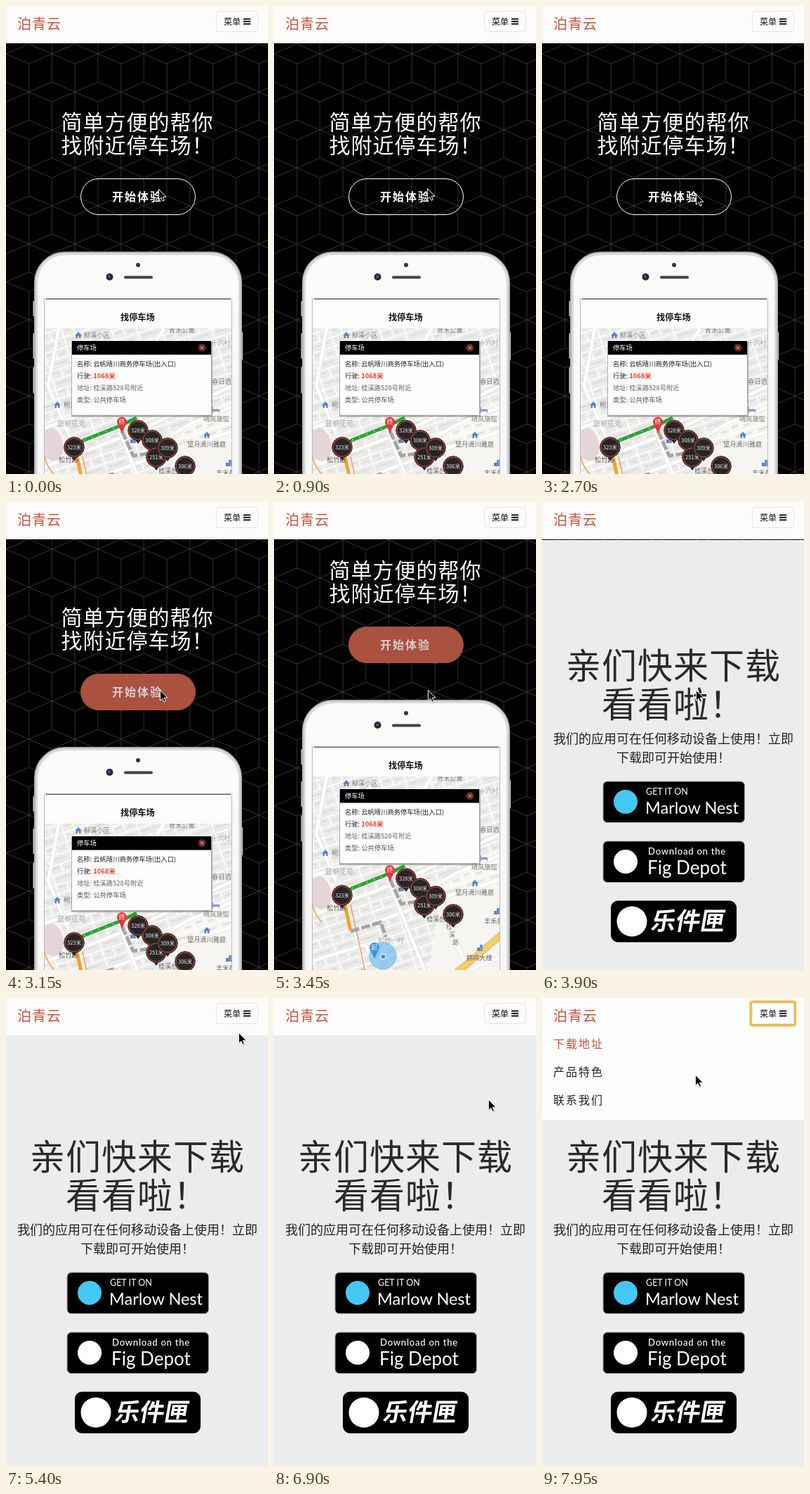
These frames come from a looping animation (373 px wide and 665 px high, 8000 ms). An HTML page:

```html
<!DOCTYPE html>
<html lang="zh">
<head>
<meta charset="utf-8">
<style>
html, body { margin: 0; width: 100%; height: 100%; overflow: hidden; background: #ebecee; }
svg { display: block; width: 373px; height: 665px; font-family: "Noto Sans CJK SC", "Noto Sans", sans-serif; }
.latin { font-family: Lato, "Open Sans", sans-serif; }
.thin { font-weight: 300; }
.bold { font-weight: 700; }
.mid { font-weight: 500; }
</style>
</head>
<body>
<svg id="stage" viewBox="0 0 373 665">
<defs>
  <pattern id="cubes" width="65.5" height="108" patternUnits="userSpaceOnUse" patternTransform="translate(32.5 54)">
    <path d="M0 0L32.75 14L0 28M65.5 0L32.75 14L65.5 28M0 28V108M65.5 28V108M32.75 14V54M32.75 82V108M32.75 0V14M32.75 54L0 68L32.75 82L65.5 68Z"
      fill="none" stroke="#393939" stroke-width=".9"/>
  </pattern>
  <pattern id="blocks" width="34" height="27" patternUnits="userSpaceOnUse" patternTransform="rotate(-18)">
    <path d="M0 .7H34M.7 0V27M17 0V14M0 14H34" stroke="#fff" stroke-width="1.5"/>
    <path d="M4 5H13M21 8H30M5 20H28" stroke="#dfdedc" stroke-width="2.4"/>
  </pattern>
  <linearGradient id="shell" x2="0" y2="1">
    <stop offset="0" stop-color="#fbfbfa"/><stop offset=".8" stop-color="#f5f5f5"/><stop offset="1" stop-color="#e7e8e9"/>
  </linearGradient>
  <linearGradient id="ring" x2="1" y2="1">
    <stop offset="0" stop-color="#222"/><stop offset=".5" stop-color="#b9b9b9"/><stop offset="1" stop-color="#333"/>
  </linearGradient>
  <clipPath id="mapClip"><rect x="55" y="458" width="266" height="389"/></clipPath>
  <clipPath id="navClip"><rect id="navBox" width="373" height="53"/></clipPath>
</defs>
<g id="page"></g>
<g id="nav" clip-path="url(#navClip)"></g>
<g id="cursor">
  <path d="M0 0V15.8L3.6 12.4L5.9 17.6L8.7 16.4L6.4 11.3H11.2Z" transform="translate(.6 1)" opacity=".25"/>
  <path d="M.4 .4V15.4L3.8 12.2L6 17.2L8.4 16.2L6.2 11.2H11Z" stroke="#fff"/>
</g>
</svg>
<script>
const $ = id => document.getElementById(id);
const RED = '#c8503f', GRAY = '#77787c';

// cy is the visual middle of the line
const text = (x, cy, s, size, fill = '#222', cls = '', more = '') =>
  `<text x="${x}" y="${cy + size * .375}" font-size="${size}" fill="${fill}" class="${cls}" ${more}>${s}</text>`;
const rect = (x, y, w, h, fill, r = 0, more = '') =>
  `<rect x="${x}" y="${y}" width="${w}" height="${h}" rx="${r}" fill="${fill}" ${more}/>`;
const circle = (x, y, r, fill, more = '') => `<circle cx="${x}" cy="${y}" r="${r}" fill="${fill}" ${more}/>`;
const line = (d, stroke, w = 1, more = '') =>
  `<path d="${d}" fill="none" stroke="${stroke}" stroke-width="${w}" ${more}/>`;
const spaced = n => `letter-spacing="${n}"`;
const centered = 'text-anchor="middle"';

const marker = (x, y, label) =>
  `<path d="M${x - 5} ${y + 12}L${x} ${y + 19}L${x + 5} ${y + 12}Z" fill="#2a2324"/>` +
  circle(x, y, 14.3, '#282425', 'stroke="#3b2524"') +
  circle(x, y, 12.8, 'none', `stroke="#a9463d" stroke-width="1.2"`) +
  text(x, y, label, 7.5, '#eee', '', centered);
const pin = (x, y, label, fill) =>
  `<path d="M${x - 6} ${y + 3}L${x} ${y + 16}L${x + 6} ${y + 3}Z" fill="${fill}"/>` +
  circle(x, y, 7, fill) + text(x, y, label, 9, '#fff', '', centered);
const house = (x, y, fill = '#5b83c9') =>
  `<path d="M${x - 5} ${y}L${x} ${y - 5}L${x + 5} ${y}H${x + 3.5}V${y + 4}H${x + 1}V${y + 1}H${x - 1}V${y + 4}H${x - 3.5}V${y}Z" fill="${fill}"/>`;
const tower = (x, y) => rect(x - 4, y - 1, 4, 5, '#5b83c9') + rect(x, y - 5, 4, 9, '#6f92d2');

function hero() {
  return rect(0, 0, 373, 1051, '#000') + rect(0, 0, 373, 1051, 'url(#cubes)') +
    text(78.5, 165, '简单方便的帮你', 30, '#fff', 'thin', spaced(1)) +
    text(78.5, 198, '找附近停车场！', 30, '#fff', 'thin', spaced(1)) +
    '<g id="start">' + rect(106.5, 245.5, 163, 51, 'none', 25.5, 'id="pill" stroke="#fff"') +
    text(151, 271, '开始体验', 16, '#fff', 'bold', 'id="pillText" ' + spaced(2)) + '</g>';
}

function map() {
  const labels = [
    [111, 468, '柳溪小区', 9.2, GRAY], [232, 461, '青禾公寓', 9.2, GRAY], [292, 479, '十六村', 9.2, '#aaa'],
    [293, 534, '春日酒店', 9.2, GRAY], [281, 587, '晴岚旅馆', 9.2, GRAY], [258, 623, '望月清川雅庭', 9.2, '#666'],
    [82, 567, '桐江苑', 9.2, GRAY], [73, 593, '碧桐花苑', 10, '#aaa'], [75, 645, '松竹路', 9.2, '#555'],
    [217, 661, '桂溪创意区', 9.2, '#666'], [299, 664, '丰禾苑', 9.2, '#666'], [148, 691, '松竹一村', 9.2, '#aaa'],
    [55, 737, '松竹二村', 9.2, '#aaa'], [274, 716, '鹤鸣大楼', 9.2, '#666'], [237, 739, '云川河湖', 9.2, '#666'],
    [256, 750, '研究所', 9.2, '#666'], [60, 787, '青溪区教', 9.2, '#666'], [56, 798, '师研习学院', 9.2, '#666'],
    [178, 800, '银帆乐城', 9.2, '#a77bc5'], [118, 825, '松竹花苑', 9.2, '#666'], [53, 845, '云鹤公园', 9.2, '#8aa88c'],
    [245, 672, '桂', 9, GRAY], [249, 683, '溪', 9, GRAY], [254, 694, '路', 9, GRAY],
    [123, 734, '竹', 8, '#dc9b6c'], [126, 744, '街', 8, '#dc9b6c']
  ];
  const roads = ['M55 600L160 560L225 458', 'M55 655L190 603L321 540', 'M97 627L60 540L75 458',
    'M185 640L260 595L321 570', 'M230 610L285 760L321 800', 'M109 678L235 632L321 605',
    'M55 720L130 697L170 770L225 847', 'M160 600L215 735L240 847', 'M260 740L321 715', 'M200 780L321 847'];
  const yellow = 'M50 795C110 788 160 778 205 765S275 723 325 682';
  const dash = 'stroke-linejoin="round" stroke-dasharray="13 3"';
  const stops = [[188, 603, '328米'], [208, 617, '308米'], [214, 641, '251米'], [230, 628, '309米'], [97, 627, '323米'],
    [255, 654, '306米'], [248, 752, '260米'], [249, 783, ''], [253, 787, '328米'], [165, 805, '264米']];
  return '<g clip-path="url(#mapClip)">' + rect(55, 458, 266, 389, '#f7f5f1') +
    '<path d="M55 458H321V560L240 610L215 760L55 795Z" fill="#ebebe9"/>' +
    '<path d="M55 458H321V600L240 630L215 760L55 795Z" fill="url(#blocks)"/>' +
    '<ellipse cx="64" cy="622" rx="19" ry="27" fill="#e5d5d9" stroke="#f8f5f4" stroke-width="4" transform="rotate(-18 64 622)"/>' +
    roads.map(d => line(d, '#e3e0da', 6) + line(d, '#fff', 4.6)).join('') +
    line('M55 640C57 650 61 658 68 665', '#f0b171', 2) +
    line('M109 640L130 735L158 815L164 847', '#e99b62', 1.4) +
    line(yellow, '#d9b04c', 10) + line(yellow, '#f1cf6b', 8.4) +
    line('M190 847C240 826 275 805 325 789', '#69bd78', 1.6) +
    line('M165 604L181 639L235 631', '#a5a5a3', 5, dash) +
    line('M109 678L152 665L159 686', '#a5a5a3', 5, dash) +
    line('M99 631L109 677', '#f2a32b', 5) +
    line('M97 627L111 617L164 596L186 585', '#28a531', 5) +
    line('M111 617L164 596', '#b8e5ba', 1.2, 'stroke-dasharray="2 9"') +
    house(103, 468) + house(73, 567) + house(286, 610) + house(110, 826) + tower(317, 650) + tower(293, 702) + tower(181, 617) +
    rect(294, 573, 10, 3, '#a486d1') + line('M294.5 570V578M303.5 574V578', '#a486d1', 1.3) +
    text(74, 774, '文', 9, '#3c9fa8', 'bold') +
    `<path d="M228 738V742L224 748H233L229 742V738Z" fill="#4ba3c7"/>` + circle(240, 774, 5, '#f0a43c') +
    labels.map(a => text(...a)).join('') +
    circle(155, 713, 19, '#6ebdec', 'fill-opacity=".68" stroke="#7bbde4"') + circle(155.5, 714, 4.2, '#fff') + circle(155.5, 714, 3, '#3389e6') +
    pin(143, 701, '起', '#3d8ee0') + pin(165, 591, '终', '#e3353c') +
    stops.map(a => marker(...a)).join('') +
    popup() + controls() + '</g>';
}

function popup() {
  const row = (cy, name, value, c) => text(101, cy, `${name}: ${value}`, 9.3, c);
  return rect(93, 477, 201, 107, '#777', 0, 'opacity=".55"') + rect(94, 476, 198, 105, '#fdfdfd') + rect(94, 476, 198, 19.5, '#000') +
    text(101, 485.5, '停车场', 9.3, '#fff') + circle(279, 485.5, 5.5, '#672923') +
    line('M277 483.5L281 487.5M281 483.5L277 487.5', '#e08a80', 1.1) +
    row(509, '名称', '云帆晴川商务停车场(出入口)', '#222') +
    row(526, '行驶', `<tspan fill="#f03a22" font-weight="700">1068米</tspan>`, '#222') +
    row(543, '地址', '桂溪路528号附近', '#666') + row(560, '类型', '公共停车场', '#555');
}

function controls() {
  return rect(284.5, 761.5, 26, 66, '#aaa', 2, 'opacity=".35"') + rect(285, 761, 24, 65, '#fdfdfd', 2) +
    line('M291 778H302M296.5 772.5V783.5M291 812H302', '#555', 1.2) + line('M289 794.5H305', '#ddd') +
    rect(61, 814, 28, 28, '#bbb', 2, 'opacity=".6"') + rect(61, 813, 27, 27, '#fff', 2) +
    circle(74.5, 827, 6.5, 'none', 'stroke="#111" stroke-width="1.5"') + circle(74.5, 827, 4, '#111') +
    line('M74.5 817V821M74.5 833V837M64.5 827H68.5M80.5 827H84.5', '#111', 1.5) +
    text(124, 812, '200 米', 8, '#222') + line('M98.5 816V821M98 819.5H168.5M168.5 816V821', '#222', 1.2) +
    rect(98, 828, 10, 10, '#75bdea') +
    text(104, 841, '© 2017 Quorvia - GS(2016)710号', 7.6, '#111');
}

function tabs() {
  const names = ['停车', '精选', '博客', '设置'];
  const star = Array.from({ length: 10 }, (_, i) => {
    const r = i % 2 ? 3.8 : 9, a = i * Math.PI / 5;
    return [154 + r * Math.sin(a), 861 - r * Math.cos(a)];
  }).join(' ');
  return rect(55, 847, 266, 34.5, '#fafafa') + line('M55 847.5H321', '#ccc') +
    names.map((s, i) => text(88 + 66 * i, 877, s, 6.6, i ? '#888' : '#111', i ? '' : 'bold', centered)).join('') +
    '<path d="M82 862L88 871L94 862Z"/>' + circle(88, 858.5, 7.5, '#111') + text(88, 858, 'P', 10, '#fff', 'bold', centered) +
    `<polygon points="${star}" fill="none" stroke="#999"/>` +
    line('M220 856C217 853 213 854 211.5 854V867C214 866 218 866 220 868C222 866 226 866 228.5 867V854C226 854 222 853 220 856V868', '#999') +
    circle(286, 861, 3, 'none', 'stroke="#999"') + circle(286, 861, 6.5, 'none', 'stroke="#999"') +
    circle(286, 861, 7.8, 'none', 'stroke="#999" stroke-width="2" stroke-dasharray="3.1 3.03"');
}

function phone() {
  return rect(38.5, 419, 4, 22, '#c7c8c9', 1) + rect(38.5, 465, 4, 36, '#c7c8c9', 1) + rect(38.5, 513, 4, 37, '#c7c8c9', 1) +
    rect(333, 463, 4, 40, '#c7c8c9', 1) +
    rect(41, 350, 294, 598, 'url(#shell)', 43, 'stroke="#aeb0b2" stroke-width="2"') +
    rect(43.5, 352.5, 289, 593, 'none', 41, 'stroke="#d9dadb" stroke-width="3"') +
    circle(188, 368, 3, '#38383b') + circle(147.5, 385, 5, '#22283c') + circle(147, 384.5, 2, '#48577f') +
    rect(168, 383.5, 41, 4, '#434345', 2) +
    rect(54.5, 415.5, 267, 467, '#fcfcfa', 1, 'stroke="#aaa" stroke-width=".8"') + line('M57 416.5H320', '#555') +
    text(163, 442, '找停车场', 12.2, '#111', 'bold') + line('M55 458.5H321', '#ccc') +
    map() + tabs() +
    circle(188, 911, 19.2, '#eceded', 'stroke="url(#ring)" stroke-width="2"');
}

function download() {
  const badge = (y, fill) => rect(87, y, 201.5, 58.5, '#000', 6, 'stroke="#a6a6a6"') + circle(119, y + 29, 17, fill);
  const big = spaced(1);
  return rect(0, 1051, 373, 700, '#ebecee') + '<g transform="translate(0 1004)">' +
    text(34, 225, '亲们快来下载', 50, '#2a2a2c', 'thin', big) + text(85, 280, '看看啦！', 50, '#2a2a2c', 'thin', big) +
    text(16, 329, '我们的应用可在任何移动设备上使用！立即', 18) + text(106, 356, '下载即可开始使用！', 18) +
    badge(390, '#43c8f5') + text(148, 404, 'GET IT ON', 12.5, '#fff', 'latin') +
    text(147, 427, 'Marlow Nest', 23.5, '#fff', 'latin') +
    badge(475, '#fff') + text(151, 489, 'Download on the', 13.2, '#fff', 'latin mid', spaced(.7)) +
    text(150, 512, 'Fig Depot', 26, '#fff', 'latin') +
    rect(98, 559.5, 179, 59, '#000', 10) + circle(128, 589, 21.5, '#fff') +
    text(0, 0, '乐件匣', 35, '#fff', 'bold', 'transform="translate(156 588) skewX(-10)"') + '</g>';
}

function nav() {
  const item = (cy, s, c) => text(16, cy, s, 16, c, 'thin', spaced(2));
  return rect(0, 0, 373, 173, '#fcfcfa', 0, 'id="navBack"') +
    text(16, 25, '泊青云', 20, RED, 'thin', spaced(1)) +
    item(65, '下载地址', RED) + item(105, '产品特色', '#222') + item(145, '联系我们', '#222') +
    '<g id="focus">' + rect(296.5, 4.5, 64.5, 35, 'none', 3, 'stroke="#f6dfa3" stroke-width="4"') +
    rect(297.5, 5.5, 62.5, 33, 'none', 3, 'stroke="#e5b545" stroke-width="2.4"') + '</g>' +
    rect(299.5, 7.5, 59, 29, 'none', 4, 'stroke="#e4e4e2"') +
    text(310, 22, '菜单', 12, '#111') + line('M338 18.5H348M338 22H348M338 25.5H348', '#111', 1.9);
}

const path = [[0, 217, 260], [600, 216, 260], [900, 218, 259], [1950, 216, 259], [2100, 215, 260], [2250, 217, 264],
  [2400, 219, 266], [2700, 219, 267], [4650, 320, 101], [4950, 328, 78], [5100, 331, 56], [5400, 331, 49],
  [5550, 336, 40], [5850, 336, 37], [6300, 336, 29], [6450, 335, 21], [6600, 330, 50], [6750, 318, 110],
  [6900, 305, 144], [7500, 270, 133], [7650, 238, 118], [7800, 222, 111], [7950, 218, 109]];

function expo(p) {
  if (p <= 0) return 0;
  if (p >= 1) return 1;
  return p < .5 ? 2 ** (20 * p - 11) : 1 - 2 ** (9 - 20 * p);
}
const smooth = p => { p = Math.min(1, Math.max(0, p)); return p * p * (3 - 2 * p); };

$('page').innerHTML = hero() + phone() + download();
$('nav').innerHTML = nav();

function draw(t) {
  const scroll = Math.round(1004 * expo((t - 3094) / 1000));
  $('page').setAttribute('transform', `translate(0 ${-scroll})`);

  const hot = t >= 3000, fill = t < 3150 ? '#5a2b22' : '#aa5140';
  $('pill').setAttribute('fill', hot ? fill : 'none');
  $('pill').setAttribute('stroke', hot ? fill : '#fff');
  $('pillText').setAttribute('fill', hot ? '#d8cfce' : '#fff');

  const open = t >= 7200;
  $('navBox').setAttribute('height', 53 + 120 * smooth((t - 7110) / 350));
  $('navBack').setAttribute('fill', open ? '#fefefe' : '#fcfcfa');
  $('focus').setAttribute('visibility', open ? 'visible' : 'hidden');

  const [, x, y] = path.filter(k => k[0] <= t).pop();
  $('cursor').setAttribute('transform', `translate(${x} ${y})`);
}

// The picture advances in steps of 150 ms
let begin;
function tick(now) {
  begin ??= now;
  draw(Math.floor((now - begin) % 8000 / 150) * 150);
  requestAnimationFrame(tick);
}
draw(0);
requestAnimationFrame(tick);
</script>
</body>
</html>
```
